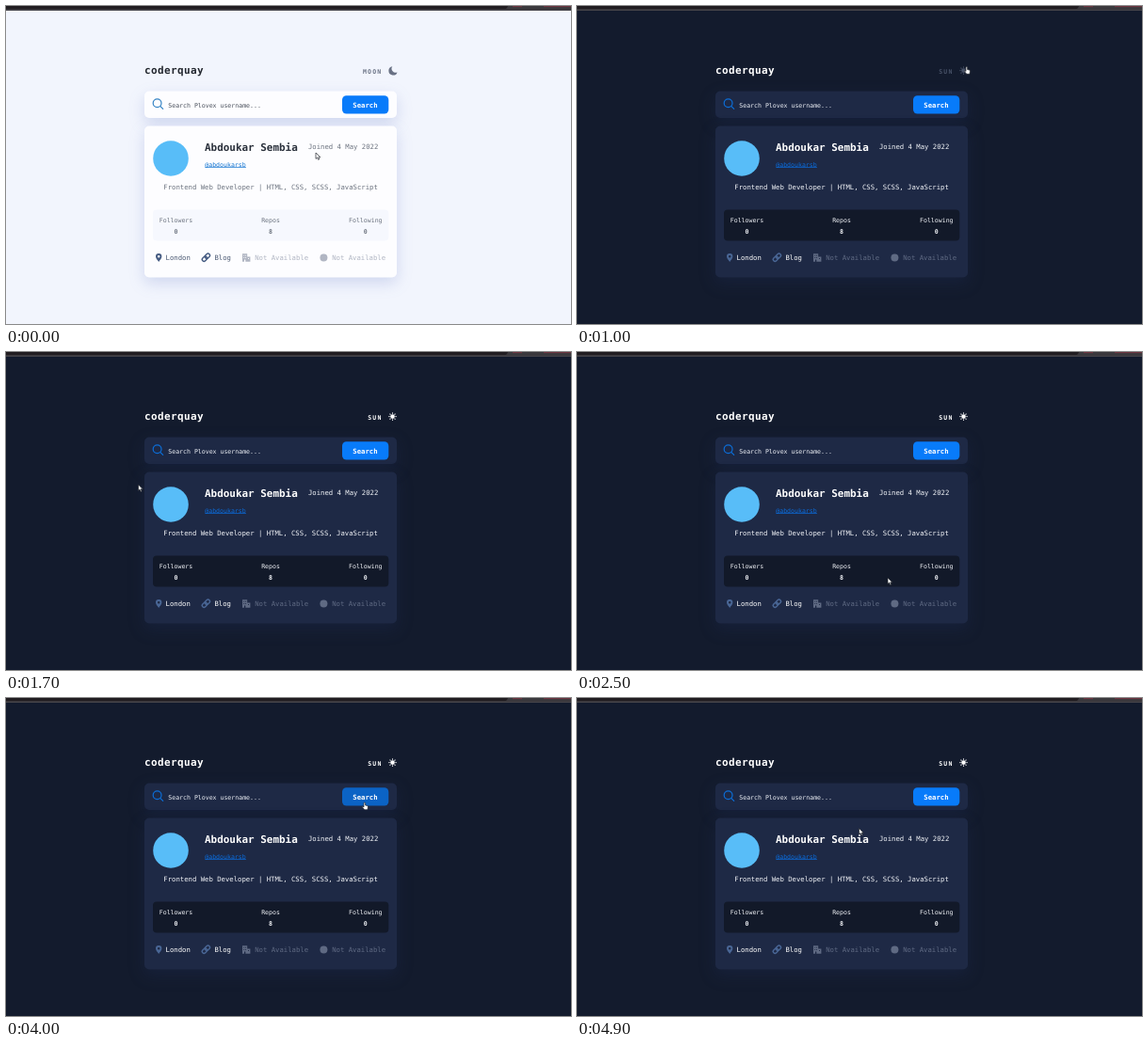
An HTML page that plays this animation: 600x338 px, repeating every 5 s.

```html
<!DOCTYPE html>
<html lang="en">
<head>
<meta charset="utf-8">
<title>Profile finder</title>
<style>
  html, body { margin: 0; width: 100%; height: 100%; overflow: hidden; }
  svg {
    display: block; width: 100%; height: 100%;
    --bg: #f2f5fd; --card: #fdfdff; --stats: #f6f8fe; --title: #23272f; --name: #2a303b;
    --body: #6c737f; --hint: #4b515c; --icon: #455b82; --place: #4a5872; --off: #b1b6c3;
    --lens: #3483c4; --link: #1475d1; --shadow: rgba(70, 96, 187, .2);
    background: var(--bg);
  }
  svg.dark {
    --bg: #131b2d; --card: #1e2945; --stats: #121929; --title: #fff; --name: #fff;
    --body: #f3f5f9; --hint: #eef1f7; --icon: #4a6796; --place: #fff; --off: #5f6a83;
    --lens: #0c6ed8; --link: #0b6cdc; --shadow: rgba(30, 44, 82, .35);
  }
  text { font-family: "DejaVu Sans Mono", "Liberation Mono", monospace; text-rendering: geometricPrecision; white-space: pre; }
  .bold { font-weight: 700; }
  .mid { text-anchor: middle; }
  .s { font-size: 6.55px; }
  .m { font-size: 7.28px; }
  .panel { fill: var(--card); filter: drop-shadow(0 6px 8px var(--shadow)); }
  .title { fill: var(--title); font-size: 11px; letter-spacing: .38px; }
  .name { fill: var(--name); font-size: 10.95px; }
  .body { fill: var(--body); }
  .hint { fill: var(--hint); }
  .place { fill: var(--place); }
  .off { fill: var(--off); }
  .icon { fill: var(--icon); }
  .link { fill: var(--link); }
  .lens { fill: none; stroke: var(--lens); stroke-width: 1.2; stroke-linecap: round; }
  .chain { fill: none; stroke: var(--icon); stroke-width: 1.4; }
  .cursor { fill: #fff; stroke: #20242c; stroke-width: .7; stroke-linejoin: round; }
  #toggle text { font-size: 6.5px; letter-spacing: 1.15px; }
</style>
</head>
<body>
<svg id="stage" viewBox="0 0 600 338" preserveAspectRatio="none">
  <rect width="600" height="5" fill="#47454a"/>
  <rect width="600" height="3.4" fill="#211d21"/>
  <path d="M529 3.4q3 0 4-3.4h67v3.4z" fill="#3b393d"/>
  <path d="M538 .6h10M571 .6h29" stroke="#713541"/>

  <g id="page">
    <text class="title bold" x="147" y="72.3">coderquay</text>
    <g id="toggle">
      <text id="label" class="bold" y="71.6"></text>
      <path id="moon" d="M410.3 64.2a4.7 4.7 0 1 0 5.2 6.2a4.2 4.2 0 0 1-5.2-6.2z"/>
      <g id="sun">
        <circle cx="410.5" cy="68.6" r="2.3"/>
        <g id="rays"></g>
      </g>
    </g>

    <rect class="panel" x="147" y="90.5" width="268" height="28.5" rx="5"/>
    <g class="lens"><circle cx="160.6" cy="103.3" r="4.4"/><path d="M163.9 106.6l2.8 2.8"/></g>
    <text class="hint s" x="172.3" y="107.7">Search Plovex username...</text>
    <rect id="button" x="357" y="95.3" width="49.3" height="19.2" rx="4.5"/>
    <text class="m bold mid" x="381.4" y="107.7" fill="#fff">Search</text>

    <rect class="panel" x="147" y="127.5" width="268" height="161" rx="5"/>
    <circle cx="175" cy="162" r="18.8" fill="#58bdf8"/>
    <text class="name bold" x="211" y="153.6">Abdoukar Sembia</text>
    <text class="body m" x="321" y="152.2">Joined 4 May 2022</text>
    <text class="link s" x="211.3" y="170.6">@abdoukarsb</text>
    <rect id="underline" class="link" x="211.3" width="43.6" height=".7"/>
    <text class="body m" x="167.3" y="194.8">Frontend Web Developer | HTML, CSS, SCSS, JavaScript</text>

    <rect x="156" y="216.5" width="250.3" height="33" rx="4" fill="var(--stats)"/>
    <g id="stats"></g>

    <path class="icon" fill-rule="evenodd" d="M162.2 272c-1.2-1.9-3.2-3.8-3.2-5.8a3.2 3.2 0 0 1 6.4 0c0 2-2 3.9-3.2 5.8zM162.2 264.9a1.3 1.3 0 1 0 0 2.6a1.3 1.3 0 0 0 0-2.6z"/>
    <text class="place m" x="169.6" y="269.8">London</text>
    <g class="chain" transform="rotate(-45 212.4 267.3)">
      <rect x="207.4" y="265.3" width="5.8" height="4" rx="2"/>
      <rect x="211.6" y="265.3" width="5.8" height="4" rx="2"/>
    </g>
    <text class="place m" x="221.5" y="269.8">Blog</text>
    <path class="off" fill-rule="evenodd" d="M251 263.2h5.2v3.3h3.2v5.3H251zM252.3 264.7h.9v1h-.9zM254.2 264.7h.9v1h-.9zM252.3 267h.9v1h-.9zM254.2 267h.9v1h-.9zM253 269.6h1.3v2.2H253zM257 268h1v1h-1z"/>
    <text class="off m" x="264.2" y="269.8">Not Available</text>
    <circle class="off" cx="337.4" cy="267.4" r="4"/>
    <text class="off m" x="346.2" y="269.8">Not Available</text>
  </g>

  <g id="cursor" class="cursor">
    <path id="arrow" d="M0 0V6.4L1.5 5.1L2.6 7.4L3.7 6.9L2.7 4.8H4.8z"/>
    <path id="hand" d="M0 1q0-1 .8-1t.8 1V3l2 .5q.9.3.8 1.2L4 7.8H.8L-1.6 5q-.3-.9.6-.8L0 5z"/>
  </g>
</svg>
<script>
  const LOOP = 5000, STEP = 100, DARK_AT = 1000, BLANK_AT = 4300, BACK_AT = 4500;
  const $ = id => document.getElementById(id);

  // Pointer stops: time, x, y
  const path = [
    [0, 329, 156], [100, 300, 200], [200, 220, 221], [300, 153, 190], [400, 215, 130],
    [500, 330, 95], [600, 413, 64.5], [1100, 413, 64.5], [1300, 405, 80], [1500, 370, 106],
    [1600, 250, 128], [1700, 140.5, 141], [1900, 158, 250], [2100, 172, 272],
    [2300, 225, 266], [2500, 330, 240], [2700, 376, 149], [2900, 300, 240],
    [3100, 187, 245], [3300, 233, 167], [3400, 219, 168], [3500, 260, 150],
    [3700, 378, 106], [3900, 275, 144], [4000, 380, 111], [4500, 378, 112],
    [4700, 340, 122], [4900, 299.5, 138.5]
  ];
  const zones = {
    toggle: [378, 62, 418, 76],
    button: [357, 95, 406, 115],
    link: [211, 164, 255, 173]
  };

  const clamp = v => Math.max(0, Math.min(1, v));
  const lerp = (a, b, p) => a + (b - a) * p;
  const mix = (a, b, p) => `rgb(${a.map((v, i) => Math.round(lerp(v, b[i], p)))})`;

  function pointerAt(t) {
    const next = path.findIndex(p => p[0] > t);
    if (next < 0) return path.at(-1).slice(1);
    const a = path[next - 1], b = path[next], p = (t - a[0]) / (b[0] - a[0]);
    return [lerp(a[1], b[1], p), lerp(a[2], b[2], p)];
  }

  const inside = ([x, y], [l, t, r, b]) => x >= l && x <= r && y >= t && y <= b;
  const show = (id, on) => $(id).style.display = on ? "" : "none";

  $("rays").innerHTML = Array.from({ length: 8 }, (_, i) =>
    `<rect x="410" y="64.4" width="1" height="1.3" transform="rotate(${i * 45} 410.5 68.6)"/>`).join("");
  $("stats").innerHTML = [["Followers", 0, 180.5], ["Repos", 8, 281], ["Following", 0, 381.8]].map(([label, n, x]) =>
    `<text class="body s mid" x="${x}" y="229.6">${label}</text>
     <text class="body s mid bold" x="${x}" y="241.6">${n}</text>`).join("");

  function draw(t) {
    const dark = t >= DARK_AT;
    const at = pointerAt(t);
    const over = Object.keys(zones).find(k => inside(at, zones[k]));

    $("stage").classList.toggle("dark", dark);
    $("label").textContent = dark ? "SUN" : "MOON";
    $("label").setAttribute("x", dark ? 384.3 : 379);
    show("moon", !dark);
    show("sun", dark);
    $("toggle").style.fill = dark
      ? mix([72, 82, 104], [255, 255, 255], clamp((t - DARK_AT) / 400))
      : mix([105, 113, 132], [30, 33, 41], clamp((t - 600) / 200));

    $("button").style.fill = over === "button" ? "#0b63c5" : "#087bfa";
    $("underline").setAttribute("y", over === "link" ? 169 : 171.2);

    // The page goes blank after the search, then slides back in.
    const back = clamp((t - BACK_AT + STEP) / 400);
    const away = t >= BLANK_AT;
    $("page").style.opacity = !away ? 1 : t < BACK_AT ? 0 : back;
    $("page").setAttribute("transform", `translate(0 ${away ? -14 * (1 - back) ** 2 : 0})`);

    $("cursor").setAttribute("transform", `translate(${at})`);
    show("hand", !!over);
    show("arrow", !over);
  }

  function tick() {
    draw(Math.floor(performance.now() % LOOP / STEP) * STEP);
    requestAnimationFrame(tick);
  }
  tick();
</script>
</body>
</html>
```
